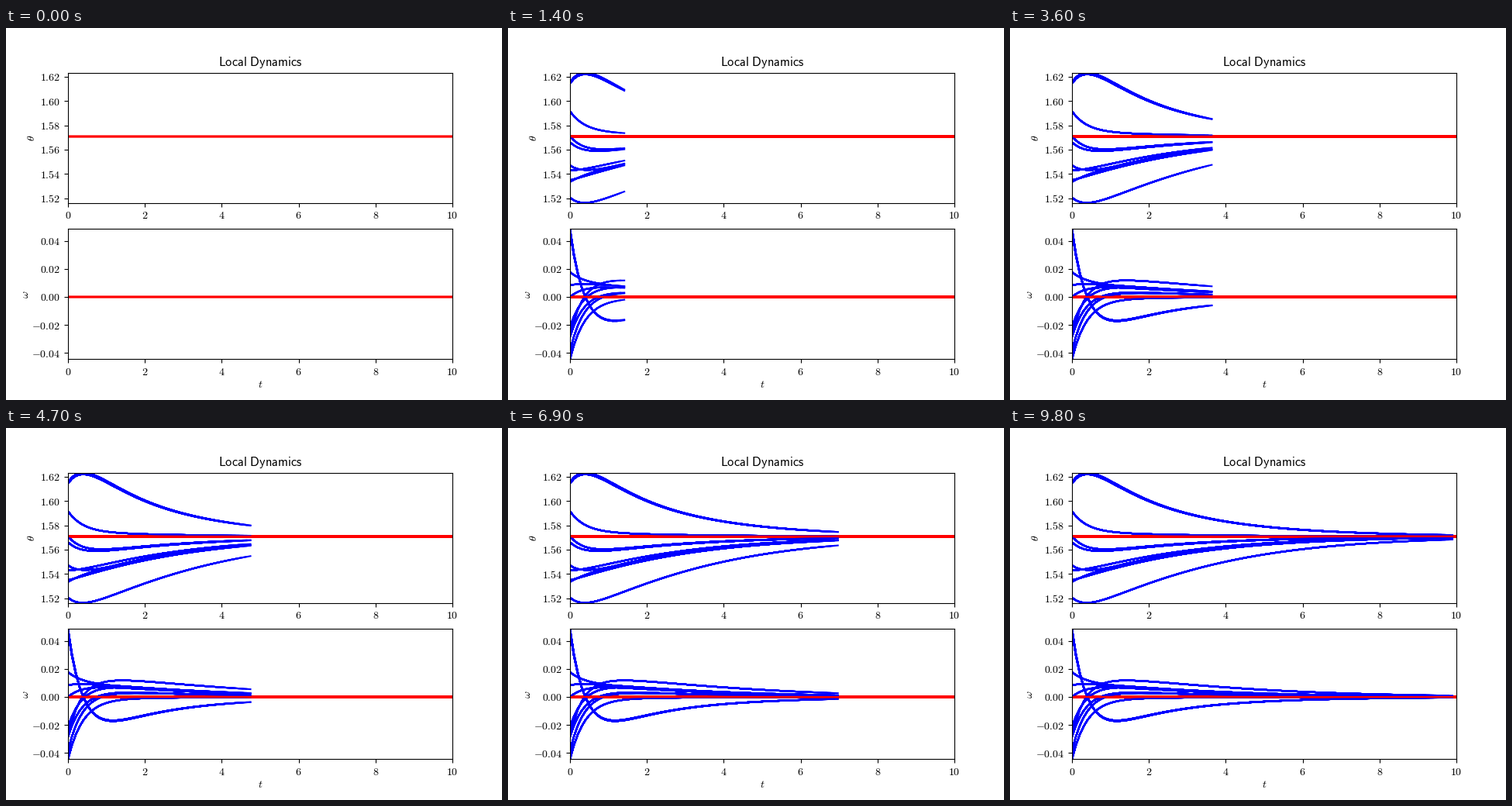
Recreate the animation shown at these times as a matplotlib script. Size 640 by 480 pixels, loop 9900 ms.

```python
import numpy as np
import matplotlib.pyplot as plt
from matplotlib.animation import FuncAnimation
from matplotlib.collections import LineCollection

plt.rcParams["mathtext.fontset"] = "cm"

STEPS = 99
PASSES = 24          # strokes pile up until their soft edges are solid
REST = np.pi / 2
t = np.linspace(0, 10, STEPS + 1)

# starting (theta - pi/2, omega) of every trajectory
starts = np.array([
    (0.0447, 0.0486), (0.0437, 0.0466), (0.0207, -0.0444), (0.0002, -0.0385),
    (-0.0048, -0.0285), (-0.0238, -0.0215), (-0.0278, 0.0), (-0.0360, 0.0085),
    (-0.0373, 0.0177), (-0.0503, -0.0277),
])


def flow(s):
    d, w = s.T
    return np.column_stack([w, -d - 3 * w - 4.9 * d ** 2])


def rk4(s, h):
    a = flow(s)
    b = flow(s + h / 2 * a)
    c = flow(s + h / 2 * b)
    return s + h / 6 * (a + 2 * b + 2 * c + flow(s + h * c))


def solve(s, sub=8):
    path = [s]
    for _ in range(STEPS):
        for _ in range(sub):
            s = rk4(s, t[1] / sub)
        path.append(s)
    return np.array(path)


path = solve(starts)
curves = [path[:, :, 0].T + REST, path[:, :, 1].T]
levels = [REST, 0.0]

fig, axes = plt.subplots(2, 1, figsize=(6.4, 4.8), dpi=100)
limits = [(1.5162, 1.62338), (-0.0444, 0.0486)]
ticks = [np.arange(1.52, 1.625, 0.02), np.arange(-2, 3) * 0.02]
layers = []

for ax, lim, marks in zip(axes, limits, ticks):
    ax.set_xlim(0, 10)
    ax.set_ylim(*lim)
    ax.set_xticks(range(0, 11, 2), [f"${x}$" for x in range(0, 11, 2)])
    ax.set_yticks(marks, [f"${y:.2f}$" for y in marks])
    stack = [LineCollection([], colors=["b", "r"], linewidths=1.5,
                            capstyle="projecting", joinstyle="round", zorder=2)
             for _ in range(PASSES)]
    for layer in stack:
        ax.add_collection(layer, autolim=False)
    layers.append(stack)

axes[0].set_title(r"$\mathsf{Local\ Dynamics}$", fontsize=11.8)


def label(x, y, text, angle=0):
    fig.text(x / 640, 1 - y / 480, text, rotation=angle, fontsize=10,
             ha="center", va="center")


label(33, 142, r"$\theta$", 90)
label(25, 343.5, r"$\omega$", 90)
label(328, 460, "$t$")


def strokes(ys, level, step):
    """Each trajectory up to this step, followed by the equilibrium line."""
    n = max(step, 0) + 1
    segs = []
    for y in ys:
        segs += [np.column_stack([t[:n], y[:n]]), [(0, level), (10, level)]]
    return segs


def update(i):
    for stack, ys, level in zip(layers, curves, levels):
        for p, layer in enumerate(stack):
            step = i - PASSES + 1 + p
            # the opening picture is stroked twice, hence step -1
            layer.set_segments(strokes(ys, level, step) if step >= -1 else [])
    return []


anim = FuncAnimation(fig, update, frames=STEPS, interval=100, repeat=True,
                     repeat_delay=0, blit=False)
plt.show()
```
